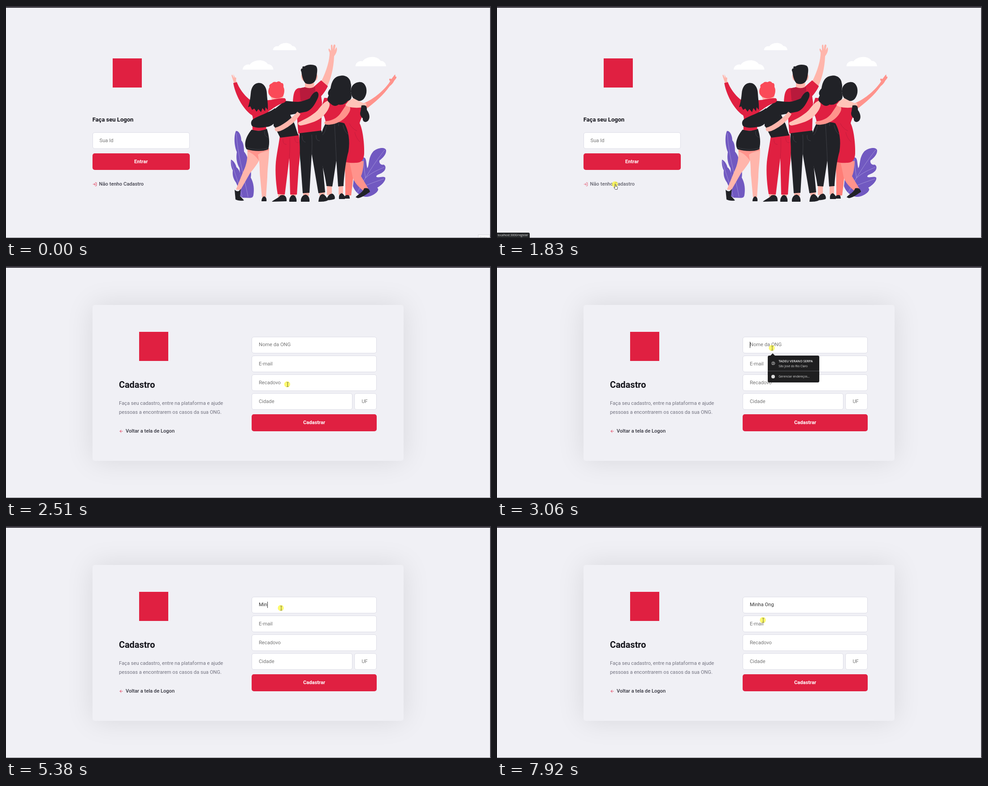
Animation of 1082x518 px, one loop 7990 ms. Source, as an HTML page with a canvas:

```html
<!DOCTYPE html>
<html lang="pt-BR">
<head>
<meta charset="utf-8">
<title>Logon e cadastro</title>
<style>
html, body { margin: 0; width: 100%; height: 100%; overflow: hidden; background: #f0f0f5; }
#stage { position: relative; width: 1082px; height: 518px; overflow: hidden; background: #f0f0f5;
  font: 400 11.16px/20px Roboto, sans-serif; color: #757575; }
#stage * { position: absolute; box-sizing: border-box; white-space: pre; }
#login, #register { inset: 0; }
#art { left: 0; top: 0; }
#card { left: 192.5px; top: 86.5px; width: 694px; height: 348px; border-radius: 5px;
  background: #f0f0f5; box-shadow: 0 0 62px rgba(0, 0, 0, .1); }
.logo { width: 65px; height: 65px; background: #e02041; }
.head { color: #13131a; font-weight: 700; }
.field { height: 37.2px; line-height: 36px; padding-left: 15px; border: .7px solid #dcdce6;
  border-radius: 5px; background: #fff; }
.wide { left: 548px; width: 279px; }
.button { height: 37.2px; line-height: 37.2px; border-radius: 5px; background: #e02041;
  color: #fff; font-weight: 700; text-align: center; }
.link { left: 0; top: 0; color: #41414d; font-weight: 500; }
.icon { width: 10px; height: 10px; fill: none; stroke: #e02041; stroke-width: 2;
  stroke-linecap: round; stroke-linejoin: round; }
#name { left: 564px; top: 166.4px; }
#typed { position: static !important; }
#caret { top: 2.6px; width: 1px; height: 14px; background: #333; }
#popup { left: 604px; top: 200px; width: 115px; height: 59.5px; border-radius: 3.5px; background: #1f1f20;
  color: #dcdcdc; font: 400 6.63px/12px "Open Sans", "Noto Sans", sans-serif; transform-origin: 50% 50%; }
#popup span { left: 24.3px; }
#popup .icon { left: 8px; stroke: #e4e4e4; width: 8.5px; height: 8.5px; }
#tip { left: 6px; top: -5px; border: 5px solid transparent; border-top: 0; border-bottom-color: #1f1f20; }
#rule { left: 0; top: 33.6px; width: 115px; height: .8px; background: #55565a; }
#disc { left: 8px; top: 42.6px; width: 8.4px; height: 8.4px; border-radius: 50%; background: #dcdcdc; }
#status { left: 0; top: 505.5px; width: 73px; height: 12.5px; padding-left: 1.5px; border-radius: 0 3px 0 0;
  background: #242628; color: #e0e0e0; font: 400 6.4px/12.5px "Open Sans", "Noto Sans", sans-serif; }
#corner { left: 1053px; top: 510px; width: 27px; height: 12px; border: 1px solid #d9d9de; background: #f7f7f9;
  padding-left: 3px; overflow: hidden; color: #aaa; font: 400 6px/12px "Open Sans", sans-serif; }
#cursor { left: 0; top: 0; width: 1082px; height: 518px; }
#topbar { left: 0; top: 0; width: 1082px; height: 3.7px; background: #3b3840; }
#side { right: 0; top: 0; width: 1.8px; height: 518px; background: #37353c; }
#floor { left: 0; top: 517px; width: 1082px; height: 1px; background: #77767c; }
</style>
</head>
<body>
<div id="stage">
  <div id="login">
    <canvas id="art" width="1082" height="518"></canvas>
    <div class="logo" style="left:238px;top:117px"></div>
    <div class="head" style="left:192.7px;top:244.2px;font-size:13.02px">Faça seu Logon</div>
    <div class="field" style="left:192.6px;top:282.3px;width:217px">Sua Id</div>
    <div class="button" style="left:192.6px;top:329px;width:217px">Entrar</div>
    <div class="link" id="signup">
      <svg class="icon" style="left:192.8px;top:393px" viewBox="0 0 24 24"><path d="M15 3h4a2 2 0 0 1 2 2v14a2 2 0 0 1-2 2h-4M10 17l5-5-5-5M15 12H3"/></svg>
      <span style="left:207.6px;top:388.2px">Não tenho Cadastro</span>
    </div>
  </div>
  <div id="register">
    <div id="card"></div>
    <div class="logo" style="left:297px;top:146.5px"></div>
    <div class="head" style="left:252px;top:255.5px;font-size:19.84px">Cadastro</div>
    <div style="left:252px;top:296.8px;line-height:19.9px;color:#737380">Faça seu cadastro, entre na plataforma e ajude
pessoas a encontrarem os casos da sua ONG.</div>
    <div class="link">
      <svg class="icon" style="left:252.3px;top:363.7px" viewBox="0 0 24 24"><path d="M19 12H5M12 19l-7-7 7-7"/></svg>
      <span style="left:267px;top:358.7px;color:#33333d">Voltar a tela de Logon</span>
    </div>
    <div class="field wide" style="top:157.8px"></div>
    <div class="field wide" style="top:200.2px">E-mail</div>
    <div class="field wide" style="top:242px">Recadovo</div>
    <div class="field" style="left:548px;top:284.2px;width:224.6px">Cidade</div>
    <div class="field" style="left:777.4px;top:284.2px;width:49.6px">UF</div>
    <div class="button wide" style="top:331.4px">Cadastrar</div>
    <div id="name"><span id="typed"></span><i id="caret"></i></div>
    <div id="popup">
      <div id="tip"></div>
      <svg class="icon" style="top:12.8px" viewBox="0 0 24 24"><circle cx="12" cy="12" r="10"/><circle cx="12" cy="9.5" r="3.4"/><path d="M6 19c2-4 10-4 12 0"/></svg>
      <span style="top:6.3px;font-size:7.1px;font-weight:600;color:#f2f2f2">TADEU VERANO SERPA</span>
      <span style="top:17.8px">São José do Rio Claro</span>
      <div id="rule"></div>
      <div id="disc"></div>
      <span style="top:40.8px">Gerenciar endereços...</span>
    </div>
  </div>
  <div id="corner">Copia</div>
  <div id="topbar"></div><div id="side"></div><div id="floor"></div>
  <div id="status">localhost:3000/register</div>
  <svg id="cursor" viewBox="0 0 1082 518">
    <g id="pointer">
      <circle r="6.6" fill="rgba(252,246,40,.68)"/>
      <path id="shape" stroke-linejoin="round"/>
    </g>
  </svg>
</div>
<script>
const $ = id => document.getElementById(id);
const ctx = $('art').getContext('2d');
const LOOP = 7990;

const INK = {
  red: '#e02041', wine: '#b81a3c', dark: '#212227', skin: '#ffb5ab', rose: '#ff938c',
  coral: '#ff7d76', pale: '#ffc4b8', hair: '#fa4a58', leaf: '#7159c1'
};

function fill(ink, ...paths) {
  ctx.fillStyle = INK[ink];
  for (const d of paths) ctx.fill(new Path2D(d));
}
function line(color, ...paths) {
  ctx.strokeStyle = color;
  ctx.lineWidth = .7;
  for (const d of paths) ctx.stroke(new Path2D(d));
}
function cloud(x, y, s) {
  ctx.save();
  ctx.translate(x, y);
  ctx.scale(s, s);
  ctx.fillStyle = '#fff';
  ctx.fill(new Path2D('M0 0C1-9 9-13 16-11C20-18 32-22 42-20.5C50-19 55-15 56-12C64-12 68-6 68.5 0Z'));
  ctx.restore();
}

function plants() {
  fill('leaf',
    'M513 279C520 278 525 290 525 300C530 305 531 316 531 325C537 332 541 342 540 352C546 362 548 373 546 383C553 395 554 410 552 422C551 428 548 428 545 428.5L528 428C521 425 522 420 522 414C528 408 526 402 527 396C523 385 522 375 521 362C514 350 513 338 515 326C509 312 508 290 513 279Z',
    'M502 343C508 346 512 352 514 360C521 365 523 374 523 382C530 388 533 396 531 406V425L521 424C524 412 516 402 513 394C506 385 505 375 506 367C502 360 501 350 502 343Z',
    'M776 384C776 360 788 345 797 338C805 338 803 350 806 362C811 357 807 338 820 324C830 316 846 314 848 322C849 331 840 340 833 345C832 352 838 356 842 354C848 356 848 364 843 369C836 376 826 376 826 381C830 385 840 379 846 383C848 390 838 400 828 406C836 410 822 424 806 426C790 427 778 414 774 402Z');
  line('#b3a6e0',
    'M514 284C516 330 530 375 540 426', 'M503 346C510 375 520 395 527 426',
    'M784 416C800 385 822 350 845 321', 'M802 384C815 372 832 365 844 360',
    'M790 406C808 398 828 391 843 386', 'M802 384C800 370 798 355 797 342');
}

function dressWoman() {
  fill('coral', 'M755 347L777 348C776 370 773 400 770 423H757C757 400 757 370 755 347Z');
  fill('rose',
    'M766 348L798 346C797 360 796 371 792 380L808 407L799 414C786 404 776 393 773 381C771 370 769 360 766 348Z',
    'M798 217C812 212 836 196 853 174L857 168C853 163 855 161 860 163L866 155C868 152 870 154 868 157L871 158C872 161 868 164 866 167C862 175 858 177 856 179C842 199 822 216 806 228Z');
  fill('dark',
    'M780 427C785 420 795 418 799 407C806 405 811 408 812 415C807 418 795 428 785 429Z',
    'M752 430C755 422 763 420 766 424L767 430Z');
  fill('red', 'M755 226C770 222 785 220 796 228C800 240 790 254 789 262C796 275 800 310 799 330C798 345 792 350 780 350C765 351 755 349 751 344Z');
  line(INK.wine, 'M766 262C770 270 775 275 783 279', 'M778 282C780 292 786 300 790 304');
  fill('dark', 'M787 170C800 168 806 182 804 194C802 204 797 212 788 212C778 213 770 203 769 191C769 180 776 171 787 170Z');
}

function tallMan() {
  fill('skin',
    'M716 181C724 165 731 140 732 112C738 105 740 95 737 92L733 99L735 88C733 84 731 86 730 90L729 98L728 87C726 85 724 87 725 92V100L721 95C718 95 720 100 722 104C722 120 716 143 703 169Z',
    'M663 415H676V424H663Z', 'M699 415H711V423H699Z');
  fill('red',
    'M686 181L703 166L718 179C712 192 704 201 696 208Z',
    'M655 183C645 184 641 192 640 214L654 217Z',
    'M653 184L668 181C675 184 682 184 688 180L700 178L705 215L703 279L652 285L648 230Z');
  fill('wine', 'M655 184L668 181C675 184 682 184 689 180C691 190 690 200 684 208C675 214 662 214 657 211Z');
  fill('skin', 'M667 172H688L687 180C682 184 673 184 667 181Z',
    'M661 152C657 152 658 166 664 167Z', 'M692 152C697 152 696 166 690 167Z');
  fill('dark',
    'M659 147C656 142 659 139 662 139C659 135 664 134 666 135C672 130 684 130 690 133C694 135 695 141 694 148C693 157 692 164 689 168C685 175 670 177 666 170C662 164 660 156 659 147Z',
    'M655 284L704 278C709 300 707 330 706 350L712 416L697 418L682 330L677 417L662 418L657 350C654 325 654 300 655 284Z',
    'M658 437C657 430 660 423 668 421C675 422 678 430 677 437Z',
    'M697 437C698 428 700 420 707 420C713 422 717 430 718 434C712 437 704 437 697 437Z');
  line('#4b4c53', 'M682 287C683 302 683 315 682 330', 'M661 290C660 297 663 303 668 304', 'M692 288C691 296 694 301 700 301');
}

function curlyWoman() {
  fill('skin', 'M716 400H727V422H716Z', 'M742 400H752V421H742Z');
  fill('red', 'M710 205L765 208C768 225 760 240 757 262L714 264C712 245 703 235 703 228Z');
  fill('dark',
    'M714 433C717 427 720 419 728 419C733 421 735 428 733 431C727 433 720 434 714 433Z',
    'M743 431C742 424 744 419 749 418C754 420 757 426 756 431Z',
    'M712 264C730 258 745 258 755 262C764 278 768 300 764 325C758 345 754 380 753 402L741 403L737 345L728 403L715 402C711 370 700 340 700 318C701 295 704 278 712 264Z');
  line('#4b4c53', 'M733 263C734 285 736 320 737 345', 'M715 268C713 278 710 284 706 288',
    'M752 266C754 276 758 283 763 286', 'M720 262V268M742 261V268');
  fill('rose', 'M760 219C770 222 770 232 764 240C755 255 735 266 716 265C708 264 709 258 715 257C730 256 742 247 748 237Z');
  fill('pale',
    'M765 211L775 206C785 211 797 218 803 217C806 222 802 226 797 226C785 228 765 228 757 221Z',
    'M720 211C710 213 704 222 695 233C682 246 664 254 652 260C650 266 656 268 662 266C680 262 697 256 706 247C716 238 722 226 722 220Z');
  fill('dark',
    'M745 156C756 153 768 160 769 172C772 182 767 188 770 196C773 206 768 211 762 212C758 218 750 222 742 220C734 226 728 222 722 216C716 213 716 206 720 200C716 194 720 188 724 184C726 172 730 158 745 156Z',
    'M793 222C802 220 806 223 805 232C811 240 813 250 808 256C802 262 795 258 796 251C790 246 789 240 791 235Z');
}

function redhead() {
  fill('skin', 'M607 416H621V426H607Z', 'M635 416H647V425H635Z');
  fill('red', 'M611 290L653 286C657 310 656 340 653 360L649 421H634L632 340L622 421L606 420C601 390 600 360 603 340C606 320 609 305 611 290Z');
  line(INK.wine, 'M633 295C634 310 633 325 632 340', 'M618 297C617 305 620 309 626 309', 'M644 294C644 303 648 306 653 305');
  fill('dark',
    'M593 437C598 432 606 430 612 423C620 420 627 424 626 436Z',
    'M632 437C631 430 635 422 641 422C647 424 649 432 648 437Z',
    'M597 232L622 212C630 212 640 214 652 214C662 213 672 209 678 206C682 198 687 192 693 191C699 194 698 202 694 209C688 222 680 233 670 236L634 243L644 264L652 289L612 294C606 284 602 272 597 268Z');
  fill('skin',
    'M588 186H619V202C616 210 606 214 601 214C592 212 588 200 588 186Z',
    'M600 272C616 268 636 252 650 236L657 241C650 255 630 272 612 279C604 282 598 279 600 272Z');
  fill('hair', 'M586 196C584 190 586 184 588 181C585 176 592 173 594 172C597 168 602 170 604 170C609 166 613 170 614 172C620 171 619 178 619 181C622 186 621 194 619 199C616 208 592 210 586 196Z');
}

function shortsWoman() {
  fill('skin',
    'M509 173L504 158C502 153 505 152 506 156L509 162L507 152L511 160C514 158 514 162 513 166L515 172Z',
    'M538 318L573 320C569 345 555 360 544 374L523 411L513 410L529 370C537 354 540 338 538 318Z',
    'M558 320L587 318C587 342 583 362 583 382L580 427H571L567 382C565 362 568 345 558 320Z');
  fill('rose', 'M539 318L587 317L586 323C576 325 568 327 562 332L564 345C558 336 549 328 540 325Z');
  fill('red', 'M507 172L515 170C521 186 535 204 548 212L576 210C590 212 610 204 622 206C626 209 625 214 620 216C606 220 594 230 585 236L582 250L580 278L550 279C549 262 553 252 549 244C533 234 513 205 507 172Z');
  fill('dark',
    'M510 410C516 416 521 414 524 408L522 424L531 434C524 436 516 434 512 432Z',
    'M570 436C570 430 573 425 576 425C580 426 582 431 581 436Z',
    'M600 228C590 236 572 242 556 250C546 254 545 262 549 268C556 273 570 272 580 270C592 270 600 262 606 250Z',
    'M548 276C560 280 572 279 582 274C587 290 589 305 585 320C570 326 552 324 537 320C531 312 532 295 548 276Z',
    'M562 172C574 170 582 182 582 196C583 210 585 222 584 232L579 226L578 235L572 228L569 237L563 230L559 236L554 229L549 232L545 224L540 226C544 214 545 205 546 195C547 182 553 173 562 172Z');
  line('#4b4c53', 'M577 279C576 287 579 292 585 293', 'M537 316C552 321 570 322 585 317');
}

cloud(528, 142, 1);
cloud(779.5, 134.5, 1);
cloud(595.5, 98.5, .765);
[plants, dressWoman, tallMan, curlyWoman, redhead, shortsWoman].forEach(draw => draw());

// Cursor moves: start, end, steps, way points
const MOVES = [
  [530, 1290, 11, [[860, 513], [269, 416]]],
  [1360, 1500, 2, [[266, 407], [263, 398]]],
  [2230, 2990, 11, [[275, 390], [706, 236], [613, 183]]],
  [7710, 7920, 3, [[610, 188], [593, 210]]]
];
const SHAPES = {
  arrow: ['M0 0V10L2.3 7.9L3.9 11.4L5.4 10.8L3.8 7.3H7Z', '#fff', .8],
  hand: ['M1 0Q2 0 2 1V4.6L5.2 5.4Q6.2 6 6 7.5L5.2 11.5H.8L-2 7.8Q-2.2 6.7-1.2 6.8L0 7.6V1Q0 0 1 0Z', '#fff', .8],
  beam: ['M-1 -4.2H.6M1.4-4.2H3M1-4V5M-1 5.2H.6M1.4 5.2H3', 'none', .9]
};
const TEXT = 'Minha Ong';
const KEYS = [4980, 5180, 5320, 5510, 5710, 6240, 6700, 7030, 7310];

const clamp = (v, lo = 0, hi = 1) => Math.min(hi, Math.max(lo, v));
const smooth = k => k * k * (3 - 2 * k);
const show = (id, on) => { $(id).style.visibility = on ? 'inherit' : 'hidden'; };

function cursorAt(t) {
  const move = MOVES.filter(m => t >= m[0]).pop();
  if (!move) return null;
  const [start, end, steps, points] = move;
  const k = Math.floor(clamp((t - start) / (end - start)) * steps + .01) / steps;
  const legs = points.length - 1;
  const leg = Math.min(legs - 1, Math.floor(k * legs));
  const e = smooth(clamp(k * legs - leg));
  return points[leg].map((v, i) => v + (points[leg + 1][i] - v) * e);
}

function drawCursor(t) {
  const pos = cursorAt(t);
  show('pointer', pos);
  if (!pos) return;
  const [x, y] = pos;
  const overField = t >= 1900 && x > 548 && x < 827 && y > 158 && y < 321;
  const kind = overField ? 'beam' : t >= 1430 && t < 1900 ? 'hand' : 'arrow';
  const [d, paint, width] = SHAPES[kind];
  $('pointer').setAttribute('transform', `translate(${x} ${y})`);
  $('shape').setAttribute('d', d);
  $('shape').setAttribute('fill', paint);
  $('shape').setAttribute('stroke', kind === 'beam' ? '#55553a' : '#222');
  $('shape').setAttribute('stroke-width', width);
}

function drawName(t) {
  const typed = KEYS.filter(k => t >= k);
  const since = t - (typed.length ? typed[typed.length - 1] : 3060);
  $('typed').textContent = typed.length ? TEXT.slice(0, typed.length) : 'Nome da ONG';
  $('typed').style.color = typed.length ? '#333' : '#757575';
  $('caret').style.left = typed.length ? 'auto' : '0';
  show('caret', since >= 0 && Math.floor(since / 530) % 2 === 0);
}

function drawPopup(t) {
  const fade = t < 4980 ? 1 : .69 - Math.floor((t - 4980) / 70) * .32;
  show('popup', t >= 3060 && fade > 0);
  $('popup').style.opacity = clamp(fade);
  $('popup').style.transform = t < 4980 ? 'none' : 'scale(.983)';
}

function frame() {
  const t = performance.now() % LOOP;
  const registering = t >= 1900;
  show('login', !registering);
  show('register', registering);
  show('corner', t < 70);
  show('status', t >= 1570 && t < 2440);
  $('signup').style.opacity = 1 - .2 * clamp((t - 1430) / 200);
  drawName(t);
  drawPopup(t);
  drawCursor(t);
  requestAnimationFrame(frame);
}
frame();
</script>
</body>
</html>
```
